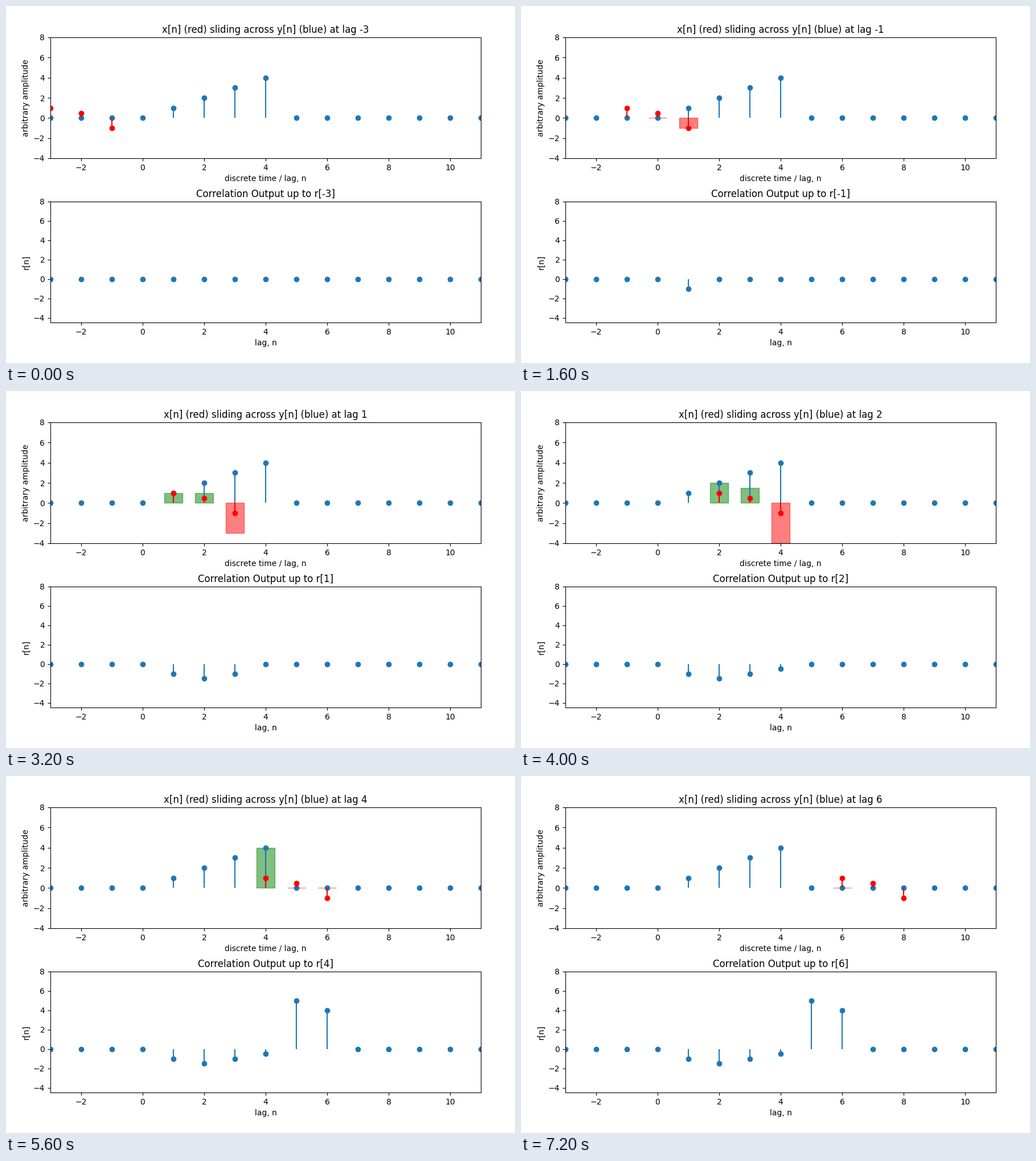
A matplotlib script that plays this animation: 894x626 px, repeating every 8 s.

```python
import numpy as np
import matplotlib.pyplot as plt
from matplotlib.animation import FuncAnimation
from matplotlib.patches import Rectangle

W, H, DPI = 894, 626, 100
FIRST_LAG, LAGS = -3, 10
BAR_WIDTH = 0.6

plt.rcParams["font.family"] = "DejaVu Sans"

x = np.array([1, 0.5, -1])
n = np.arange(-3, 12)
y = np.where((n >= 0) & (n <= 4), n, 0)


def y_at(k):
    return y[k - n[0]]


def correlate(lag):
    return sum(x[i] * y_at(lag + i) for i in range(len(x)))


def add_axes(top, ylim, xlabel, ylabel):
    height = 212
    ax = fig.add_axes([78 / W, 1 - (top + height) / H, 756 / W, height / H])
    ax.set(xlim=(-3, 11), ylim=ylim, xlabel=xlabel, ylabel=ylabel)
    ax.set_xticks(range(-2, 11, 2))
    ax.set_yticks(range(-4, 9, 2))
    return ax


def set_stems(stems, pos, values):
    stems.markerline.set_data(pos, values)
    stems.stemlines.set_segments([[(p, 0), (p, v)] for p, v in zip(pos, values)])


fig = plt.figure(figsize=(W / DPI, H / DPI), dpi=DPI, facecolor="white")
ax_in = add_axes(55, (-4, 8), "discrete time / lag, n", "arbitrary amplitude")
ax_out = add_axes(343, (-4.5, 8), "lag, n", "r[n]")

ax_in.stem(n, y, basefmt=" ")
x_stems = ax_in.stem(np.arange(3) + FIRST_LAG, x, linefmt="r-",
                     markerfmt="ro", basefmt=" ")
r_stems = ax_out.stem(n, np.zeros(len(n)), basefmt=" ")
bars = [ax_in.add_patch(Rectangle((0, 0), BAR_WIDTH, 0, alpha=0.5)) for _ in x]


def update(frame):
    lag = FIRST_LAG + frame
    pos = lag + np.arange(len(x))
    set_stems(x_stems, pos, x)

    # Products are shown only where the two signals overlap
    for bar, p, v in zip(bars, pos, x):
        product = v * y_at(p)
        bar.set_visible(0 <= p <= 6)
        bar.set_xy((p - BAR_WIDTH / 2, 0))
        bar.set_height(product)
        bar.set_color("green" if product > 0 else "red")

    # Each result sits under the last sample of x
    r = [correlate(k - 2) if -1 <= k <= lag + 2 else 0 for k in n]
    set_stems(r_stems, n, r)

    ax_in.set_title(f"x[n] (red) sliding across y[n] (blue) at lag {lag}")
    ax_out.set_title(f"Correlation Output up to r[{lag}]")


anim = FuncAnimation(fig, update, frames=LAGS, interval=800,
                     repeat=True, repeat_delay=0)
plt.show()
```
